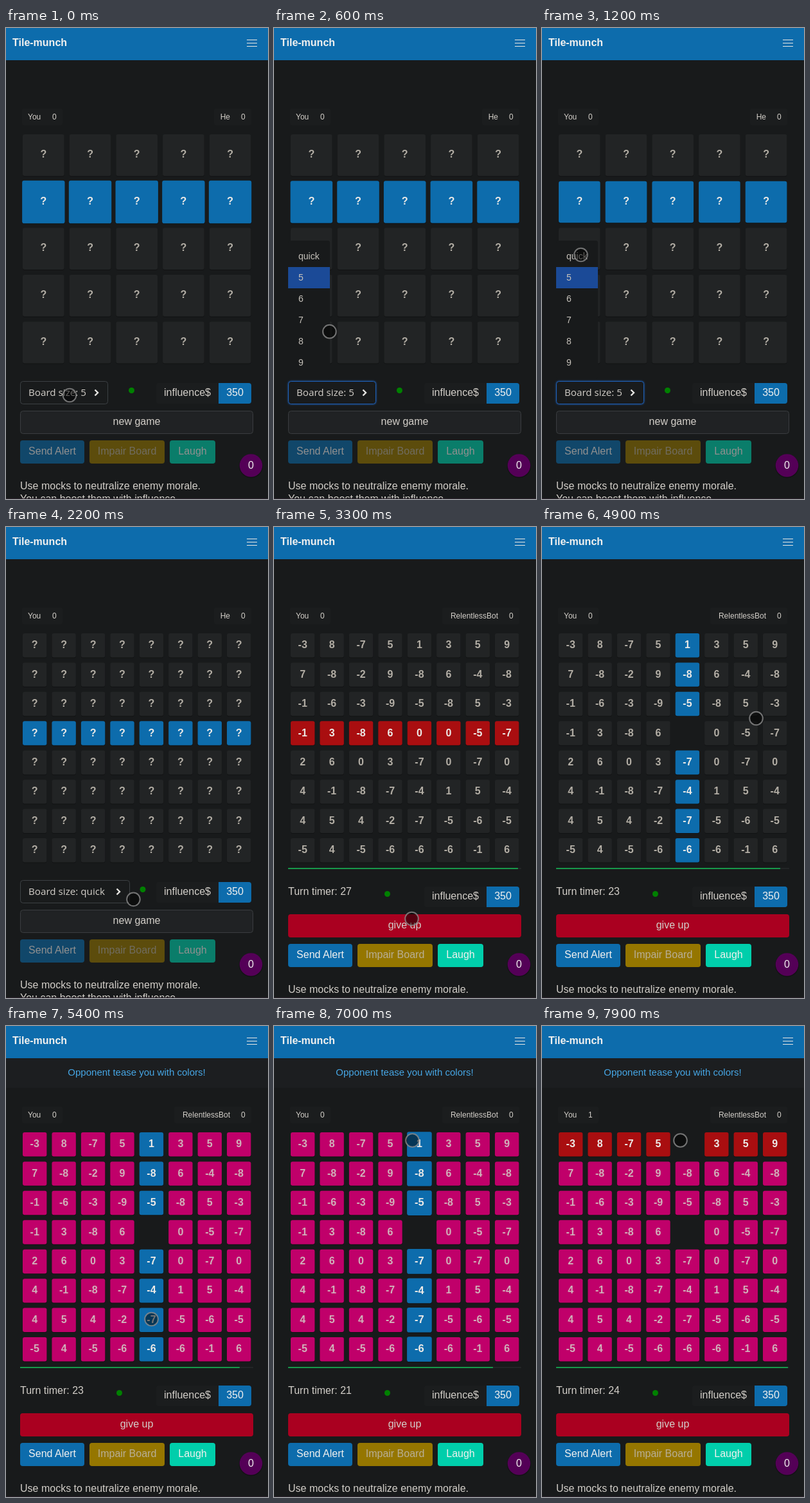
Write an HTML page that moves like this. It is 408 px wide and 731 px high and loops after 8 s.

```html
<!DOCTYPE html>
<html lang="en">
<head>
<meta charset="utf-8">
<title>Tile-munch</title>
<style>
  html, body { margin: 0; width: 100%; height: 100%; overflow: hidden; background: #181a1b; }
  svg { display: block; width: 408px; height: 731px; font: 16px "Liberation Sans", Arial, sans-serif; fill: #d3cfc9; }
  .small { font-size: 12px; }
  .mid { text-anchor: middle; }
  .end { text-anchor: end; }
  .bold { font-weight: bold; }
  .white { fill: #f2f1ef; }
  .select { font: 15.2px "Open Sans", "Noto Sans", sans-serif; }
  .item { font-size: 14px; fill: #c6c2bb; }
  .tile rect { fill: #222425; }
  .tile text { fill: #b3aea5; font-weight: bold; text-anchor: middle; }
  .pink rect { fill: #c0006a; }
  .pink text { fill: #d0b1ba; }
  .blue rect { fill: #0d6cac; }
  .red rect { fill: #a90e10; }
  .blue text, .red text { fill: #eceae7; }
</style>
</head>
<body>
<script>
const LOOP = 8000, STEP = 100;
const OPENED = 300, PICKED = 1500, STARTED = 2700, BOT_MOVE = 3800, TEASED = 5200, MY_MOVE = 7700;
const BLUE = '#0d6cac', BG = '#181a1b';
const VALUES = [
  '-3 8 -7 5 1 3 5 9', '7 -8 -2 9 -8 6 -4 -8', '-1 -6 -3 -9 -5 -8 5 -3', '-1 3 -8 6 0 0 -5 -7',
  '2 6 0 3 -7 0 -7 0', '4 -1 -8 -7 -4 1 5 -4', '4 5 4 -2 -7 -5 -6 -5', '-5 4 -5 -6 -6 -6 -1 6'
].map(row => row.split(' '));
// time, x, y
const POINTER = [
  [0, 99, 570], [200, 99, 570], [900, 77, 397], [1050, 37, 374], [1200, 60.5, 352], [1700, 60.5, 352],
  [2300, 226, 623], [2600, 226, 623], [2700, 224, 616], [2900, 224, 616], [3300, 214.5, 608],
  [3800, 377, 604], [4600, 250, 276], [4900, 333.5, 297], [5400, 226.5, 455], [5600, 226.5, 455],
  [6400, 215.5, 177.5], [LOOP, 215.5, 177.5]
];

function el(tag, attrs, parent, text) {
  const node = document.createElementNS('http://www.w3.org/2000/svg', tag);
  for (const key in attrs) node.setAttribute(key, attrs[key]);
  if (text !== undefined) node.textContent = text;
  parent.append(node);
  return node;
}
const svg = el('svg', { viewBox: '0 0 408 731' }, document.body);
const group = (parent = svg) => el('g', {}, parent);
const box = (parent, x, y, width, height, fill, rx = 0, more = {}) =>
  el('rect', { x, y, width, height, fill, rx, ...more }, parent);
const label = (parent, x, y, text, cls = '') => el('text', { x, y, class: cls }, parent, text);
const show = (node, on) => { node.style.display = on ? '' : 'none'; };
const move = (node, x, y) => node.setAttribute('transform', `translate(${x} ${y})`);

function board(n, valueAt) {
  const root = group(), gap = 8, size = (355.4 - gap * (n - 1)) / n, tiles = [];
  for (let i = 0; i < n * n; i++) {
    const row = Math.floor(i / n), col = i % n;
    const x = 26 + col * (size + gap) + size / 2, y = 165 + row * (size + gap) + size / 2;
    const node = el('g', { class: 'tile' }, root);
    box(node, -size / 2, -size / 2 + 1, size, size, '', 3, { style: 'fill:#111213' });
    box(node, -size / 2, -size / 2, size, size, '', 3);
    label(node, 0, n === 5 ? 3.6 : 4.6, valueAt(row, col));
    tiles.push({ node, row, col, x, y });
  }
  const paint = (styleOf, scale = 1) => tiles.forEach(({ node, row, col, x, y }) => {
    const style = styleOf(row, col), k = style === 'blue' ? scale : 1;
    show(node, style !== 'gone');
    node.setAttribute('class', 'tile ' + style);
    node.setAttribute('transform', `translate(${x} ${y}) scale(${k})`);
  });
  return { root, paint };
}

function selectBox(text, width) {
  const root = group(controls);
  const frame = box(root, 22.5, 548.5, width - 1, 35, '#191b1c', 4, { stroke: '#3c4043' });
  label(root, 35, 571, text, 'select');
  const x = 22 + width - 20.5;
  el('path', { d: `M${x} 561.5l4.5 4.5l-4.5 4.5`, fill: 'none', stroke: '#e8e6e3', 'stroke-width': 2.4 }, root);
  return { root, frame };
}

function button(parent, x, y, width, fill, text, cls) {
  box(parent, x, y, width, 36, fill, 4);
  return label(parent, x + width / 2, y + 22, text, 'mid ' + cls);
}

// Header
box(svg, 0, 0, 408, 50, BLUE);
label(svg, 10, 28, 'Tile-munch', 'bold white');
for (const y of [18, 23, 28]) box(svg, 375, y, 16, 1, '#e8e6e3');

const banner = group();
box(banner, 0, 50, 408, 46, '#1c1e20');
label(banner, 203.5, 77, 'Opponent tease you with colors!', 'mid').setAttribute('style', 'font-size:15px;fill:#46a6e4');

// Scores
box(svg, 25, 125, 63, 26, '#1b1d1e', 3);
label(svg, 34, 142, 'You', 'small');
const myScore = label(svg, 72, 142, '0', 'small');
const rivalBox = box(svg, 324, 125, 58, 26, '#1b1d1e', 3);
const rival = label(svg, 349, 142, 'He', 'small end');
label(svg, 366, 142, '0', 'small');

// Boards
const idle5 = board(5, () => '?');
const idle8 = board(8, () => '?');
const game = board(8, (row, col) => VALUES[row][col]);

const timeline = group();
box(timeline, 22, 529, 363, 2, '#222526');
const bar = box(timeline, 22, 529, 363, 2, '#17984a');
const timer = label(timeline, 22, 571, '');

// Controls
const controls = group();
const sizeFive = selectBox('Board size: 5', 137);
const sizeQuick = selectBox('Board size: quick', 171);
const dot = el('circle', { cy: 562.5, r: 4.5, fill: '#008000' }, controls);
box(controls, 234, 551, 100, 32, '#1b1d1e', 4);
label(controls, 246, 571, 'influence$');
el('path', { d: 'M331 551h47a4 4 0 0 1 4 4v24a4 4 0 0 1 -4 4h-47z', fill: BLUE }, controls);
label(controls, 356.5, 571, '350', 'mid white');

const fresh = group(controls);
box(fresh, 22.5, 594.5, 362, 35, '#202224', 4, { stroke: '#3a3d40' });
label(fresh, 203.5, 616, 'new game', 'mid');
const quit = group(controls);
button(quit, 22, 594, 363, '#aa0020', 'give up', '');

const actions = group(controls);
button(actions, 22, 640, 100, BLUE, 'Send Alert', 'white');
button(actions, 130, 640, 117, '#957600', 'Impair Board', '').style.fill = '#b8af98';
button(actions, 255, 640, 71, '#00ceab', 'Laugh', 'white');
label(controls, 22, 716, 'Use mocks to neutralize enemy morale.');
label(controls, 22, 736, 'You can boost them with influence.');
box(svg, 0, 730, 408, 1, '#2a212b');

// Size menu
const menu = group();
box(menu, 22, 330, 65, 214, BG, 3);
box(menu, 22, 371, 65, 33, '#1b4a97');
['quick', 5, 6, 7, 8, 9].forEach((text, i) => {
  label(menu, 38, 359 + 33 * i, text, i === 1 ? 'item white' : 'item');
});

// Counter badge
const badge = group();
el('circle', { cx: 381.5, cy: 680, r: 18.5, fill: '#000', opacity: .3 }, badge);
el('circle', { cx: 381.5, cy: 679, r: 17.8, fill: '#540057' }, badge);
label(badge, 381.5, 684, '0', 'mid white');

const pointer = el('circle', {
  r: 10.3, fill: '#000', 'fill-opacity': .5, stroke: '#8c8c8c', 'stroke-opacity': .8, 'stroke-width': 2
}, svg);

function pointerAt(t) {
  const i = POINTER.findIndex(p => p[0] > t);
  const [t0, x0, y0] = POINTER[i - 1], [t1, x1, y1] = POINTER[i];
  const k = (t - t0) / (t1 - t0);
  return [x0 + (x1 - x0) * k, y0 + (y1 - y0) * k];
}

function gameStyle(t) {
  const plain = t >= TEASED ? 'pink' : '';
  return (row, col) => {
    if (t >= BOT_MOVE && row === 3 && col === 4) return 'gone';
    if (t >= MY_MOVE) {
      if (row === 0) return col === 4 ? 'gone' : 'red';
      return plain;
    }
    if (t >= BOT_MOVE) return col === 4 ? 'blue' : plain;
    return row === 3 ? 'red' : plain;
  };
}

function clock(t) {
  if (t >= MY_MOVE) return { left: 24, start: 7760 };
  if (t >= BOT_MOVE) return { left: 24 - Math.floor((t - BOT_MOVE) / 1000), start: 3920 };
  return { left: t < 3200 ? 28 : 27, start: 2950 };
}

function render(t) {
  const playing = t >= STARTED, picked = t >= PICKED;
  const open = t >= OPENED && !picked;

  show(idle5.root, !picked);
  show(idle8.root, picked && !playing);
  show(game.root, playing);
  if (!picked) {
    idle5.paint(row => row === 1 ? 'blue' : '', 1 + .027 * Math.cos(Math.min(t / 950, 1) * Math.PI / 2));
  } else if (!playing) {
    idle8.paint(row => row === 3 ? 'blue' : '');
  } else {
    const swell = t > 6600 ? .05 * Math.sin(Math.PI * (t - 6600) / 1700) : 0;
    game.paint(gameStyle(t), 1 + swell);
  }

  show(menu, open);
  sizeFive.frame.setAttribute('stroke', open ? '#1f5fb4' : '#3c4043');
  sizeFive.frame.style.filter = open ? 'drop-shadow(0 0 1.5px #1f5fb4)' : '';
  show(sizeFive.root, !picked);
  show(sizeQuick.root, picked && !playing);
  show(timeline, playing);
  show(fresh, !playing);
  show(quit, playing);
  show(banner, t >= TEASED);
  actions.setAttribute('opacity', playing ? 1 : .55);
  move(controls, 0, playing ? 7 : 0);
  dot.setAttribute('cx', playing ? 176.5 : picked ? 213 : 195.5);

  rival.textContent = playing ? 'RelentlessBot' : 'He';
  rivalBox.setAttribute('x', playing ? 262 : 324);
  rivalBox.setAttribute('width', playing ? 120 : 58);
  myScore.textContent = t >= MY_MOVE ? '1' : '0';

  const { left, start } = clock(t);
  timer.textContent = 'Turn timer: ' + left;
  bar.setAttribute('width', 363 - .0143 * Math.max(0, t - start));
  move(pointer, ...pointerAt(t));
}

const began = performance.now();
function tick() {
  const t = (performance.now() - began) % LOOP;
  render(Math.floor(t / STEP) * STEP);
  requestAnimationFrame(tick);
}
tick();
</script>
</body>
</html>
```
